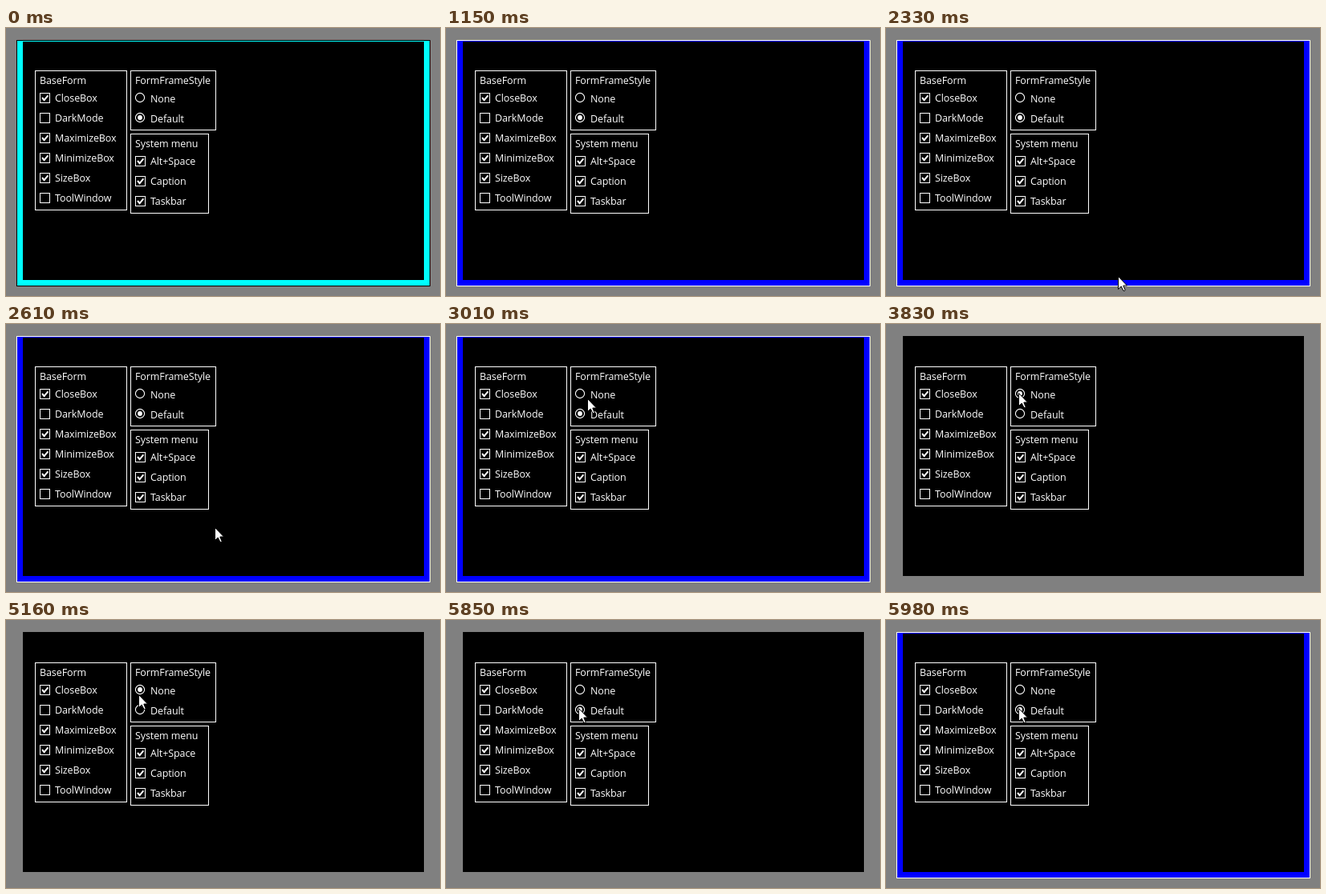
An HTML page that plays this animation: 541 by 335 pixels, repeating every 7710 ms.

```html
<!DOCTYPE html>
<html lang="en">
<head>
<meta charset="utf-8">
<title>Form frame styles</title>
<style>
  html, body { margin: 0; width: 100%; height: 100%; overflow: hidden; background: #808080; }
  svg { display: block; }
  text { font: 12.5px "Open Sans", "Noto Sans", sans-serif; letter-spacing: -.1px; fill: #fff; }
  .line { fill: none; stroke: #fff; }
  .tick { fill: none; stroke: #fff; stroke-width: 2; }
</style>
</head>
<body>
<svg id="stage" width="541" height="335" viewBox="0 0 541 335">
  <rect width="541" height="335" fill="#808080"/>
  <rect id="frame" x="13.5" y="15.5" width="515" height="307"/>
  <rect id="client" x="21" width="500"/>
  <g id="form"></g>
  <path id="cursor" d="M.5 .5V16.5L4.2 13L7 18.5H8.5L9 17.5L6.8 12H11.5Z" fill="#fff" stroke="#000"/>
</svg>
<script>
const LOOP = 7710;
const $ = id => document.getElementById(id);
const form = $('form');

function add(tag, attrs, content = '') {
  const el = document.createElementNS('http://www.w3.org/2000/svg', tag);
  for (const key in attrs) el.setAttribute(key, attrs[key]);
  el.textContent = content;
  form.append(el);
  return el;
}

const label = (x, y, s) => add('text', { x, y }, s);

function group(x, y, width, height, title) {
  add('rect', { class: 'line', x: x + .5, y: y + .5, width: width - 1, height: height - 1 });
  label(x + 6, y + 17, title);
}

function checkBox(x, y, name, on) {
  add('rect', { class: 'line', x: x + .5, y: y + .5, width: 12, height: 12 });
  if (on) add('path', { class: 'tick', d: `M${x + 3} ${y + 6}l2.6 3.2l4.8 -5.8` });
  label(x + 19, y + 11, name);
}

// Returns the dot, which is shown while the option is chosen.
function radio(cx, cy, name) {
  add('circle', { class: 'line', cx, cy, r: 5.6, 'stroke-width': 1.1 });
  label(cx + 13, cy + 6, name);
  return add('circle', { cx, cy, r: 2.9, fill: '#fff' });
}

group(36, 53, 115, 175, 'BaseForm');
const unchecked = ['DarkMode', 'ToolWindow'];
['CloseBox', 'DarkMode', 'MaximizeBox', 'MinimizeBox', 'SizeBox', 'ToolWindow']
  .forEach((name, i) => checkBox(42, 81 + 25 * i, name, !unchecked.includes(name)));

group(155, 53, 107, 75, 'FormFrameStyle');
const noneDot = radio(167, 87, 'None');
const defaultDot = radio(167, 112, 'Default');

group(155, 132, 98, 100, 'System menu');
['Alt+Space', 'Caption', 'Taskbar']
  .forEach((name, i) => checkBox(161, 160 + 25 * i, name, true));

// Each table holds [start time, ...values].
const frames = [
  [0, '#0ff', '#000'],
  [1150, '#00f', '#fff'],
  [3830, null, null],
  [5980, '#00f', '#fff']
];
const choices = [[0, 'Default'], [3760, 'None'], [5850, 'Default']];
const moves = [
  [3010, 176, 93], [3080, 170, 89], [3170, 167, 87], [3230, 165, 86],
  [5160, 165, 93], [5230, 165, 100], [5300, 165, 105], [5380, 165, 108], [5450, 165, 110]
];

const at = (table, t) => table.findLast(row => row[0] <= t);
const show = (el, on) => el.setAttribute('visibility', on ? 'visible' : 'hidden');

function cursorAt(t) {
  if (t < 2330) return null;
  if (t >= 3010) return at(moves, t).slice(1);
  const u = Math.floor((t - 2330) / (680 / 9)) / 9;
  const p = u * u * (3 - 2 * u);
  return [Math.round(289 - 113 * p), Math.round(310 - 217 * p)];
}

function draw(t) {
  const [, fill, edge] = at(frames, t);
  const top = fill ? 17 : 15;
  show($('frame'), fill);
  if (fill) {
    $('frame').setAttribute('fill', fill);
    $('frame').setAttribute('stroke', edge);
  }
  $('client').setAttribute('y', top);
  $('client').setAttribute('height', 315 - top);

  const choice = at(choices, t)[1];
  show(noneDot, choice === 'None');
  show(defaultDot, choice === 'Default');

  const pos = cursorAt(t);
  show($('cursor'), pos);
  if (pos) $('cursor').setAttribute('transform', `translate(${pos})`);
}

const start = performance.now();
function tick() {
  draw((performance.now() - start) % LOOP);
  requestAnimationFrame(tick);
}
tick();
</script>
</body>
</html>
```
